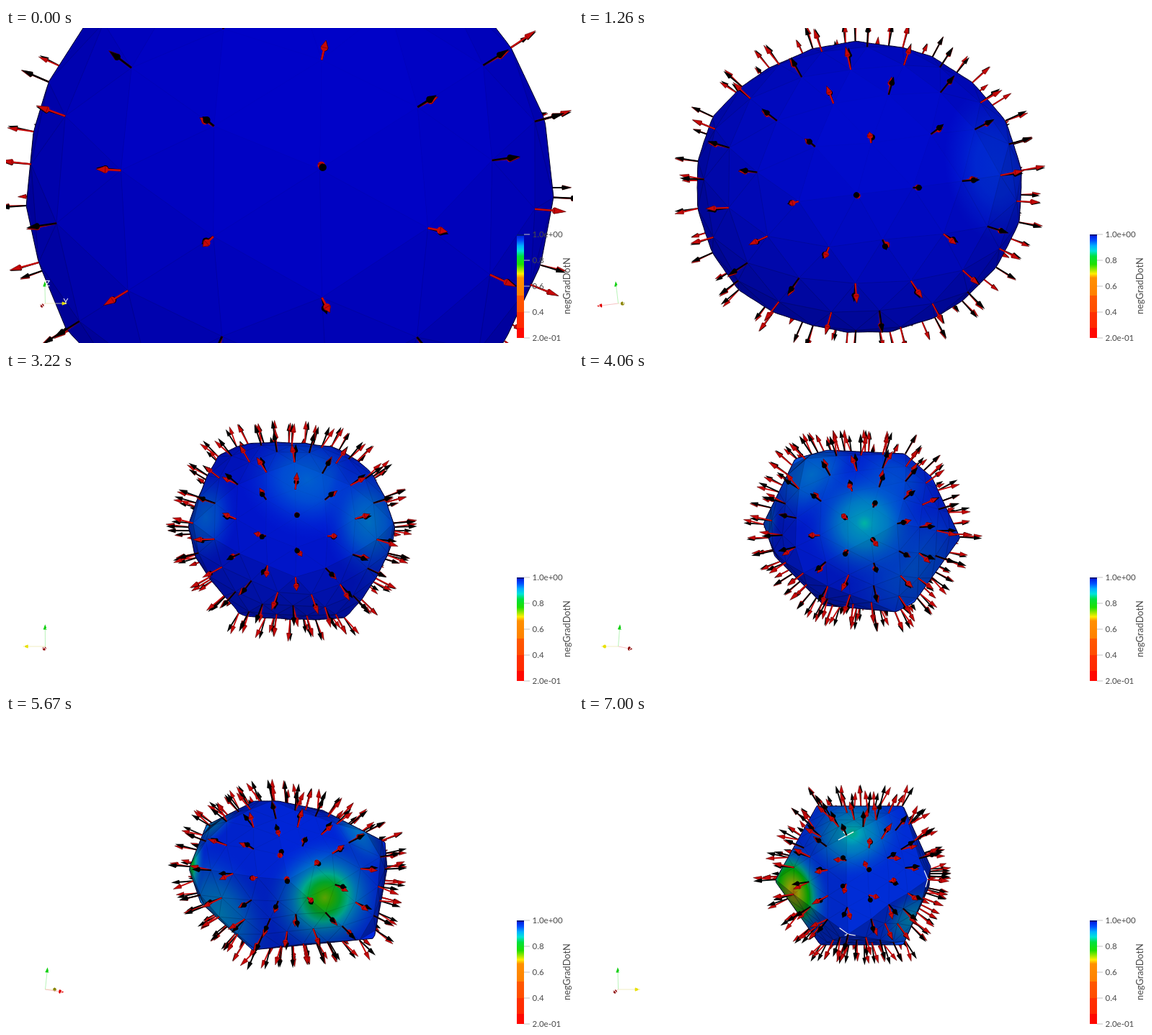
An HTML page with a canvas for the animation above (7.07 s loop, 787 by 438 pixels).

```html
<!DOCTYPE html>
<html lang="en">
<head>
<meta charset="utf-8">
<title>negGradDotN</title>
<style>
  html, body { margin: 0; width: 100%; height: 100%; overflow: hidden; background: #fff; }
  canvas { display: block; }
</style>
</head>
<body>
<canvas id="stage" width="787" height="438"></canvas>
<script>
const ctx = document.getElementById('stage').getContext('2d');
const W = 787, H = 438, CX = 393.5, CY = 222, FOCAL = 817;
const STEP = 70, LOOP = 7070, TURN = 7000;
const TILT = 7 * Math.PI / 180, START = 11 * Math.PI / 180;
const PHI = (1 + Math.sqrt(5)) / 2, RAYS = 180, TAU = 2 * Math.PI;

// Outline of the body at a few times: an oval early on, corners later
const outlines = [
  { time: 0 },
  { time: 1260, oval: [390, 222, 226, 202] },
  { time: 2450, oval: [403, 222, 164, 144] },
  { time: 4060, corners: '300,122 345,110 452,115 490,148 529,232 465,322 440,335 340,326 272,258 256,212' },
  { time: 4760, corners: '260,137 385,114 445,124 532,184 524,295 400,332 355,320 236,273 243,170' },
  { time: 5670, corners: '345,121 378,121 440,134 526,178 529,215 511,312 342,328 270,262 254,215 278,155' },
  { time: 7000, corners: '330,128 450,128 488,212 486,240 450,321 335,321 272,232' }
];

// Soft spots on the surface: azimuth, height, radius, drop in value, growth time
const spots = [
  [255, -.38, .85, .13, 4250],
  [126, .12, .45, .07, 1900],
  [188, .5, .6, .09, 2400],
  [243, .55, .5, .14, 4300],
  [3, .48, .6, .18, 5500],
  [57, -.55, .5, .17, 5900],
  [221, .08, .58, .23, 3400],
  [320, -.2, .66, .36, 4900]
];

const lerp = (a, b, u) => a + (b - a) * u;
const clamp = (v, lo = 0, hi = 1) => Math.min(hi, Math.max(lo, v));
const dot = (a, b) => a[0] * b[0] + a[1] * b[1] + a[2] * b[2];
const cross = (a, b) => [a[1]*b[2] - a[2]*b[1], a[2]*b[0] - a[0]*b[2], a[0]*b[1] - a[1]*b[0]];
const unit = v => v.map(c => c / Math.hypot(...v));
const sub = (a, b) => a.map((c, i) => c - b[i]);
const addScaled = (a, b, k) => a.map((c, i) => c + b[i] * k);

let seed = 17;
const random = () => (seed = (seed * 16807) % 2147483647) / 2147483647;

function buildSphere() {
  const dirs = [];
  for (const a of [-1, 1]) for (const b of [-PHI, PHI]) {
    dirs.push(unit([0, a, b]), unit([a, b, 0]), unit([b, 0, a]));
  }
  const edge = 2 / Math.hypot(1, PHI);
  const near = (i, j) => Math.abs(Math.hypot(...sub(dirs[i], dirs[j])) - edge) < .01;
  let faces = [];
  for (let i = 0; i < 12; i++) for (let j = i + 1; j < 12; j++) for (let k = j + 1; k < 12; k++) {
    if (!near(i, j) || !near(j, k) || !near(i, k)) continue;
    faces.push(dot(cross(dirs[i], dirs[j]), dirs[k]) > 0 ? [i, j, k] : [i, k, j]);
  }
  const normals = faces.map(f => unit(f.reduce((s, i) => addScaled(s, dirs[i], 1), [0, 0, 0])));
  for (let level = 0; level < 2; level++) {
    const cache = {};
    const mid = (i, j) => {
      const key = Math.min(i, j) + '-' + Math.max(i, j);
      if (!(key in cache)) cache[key] = dirs.push(unit(addScaled(dirs[i], dirs[j], 1))) - 1;
      return cache[key];
    };
    faces = faces.flatMap(([a, b, c]) => {
      const ab = mid(a, b), bc = mid(b, c), ca = mid(c, a);
      return [[a, ab, ca], [ab, b, bc], [ca, bc, c], [ab, bc, ca]];
    });
  }
  return { dirs, faces, flat: dirs.map(d => .795 / Math.max(...normals.map(n => dot(n, d)))) };
}

const sphere = buildSphere();
const jitter = sphere.dirs.map(() => [random() - .5, random() - .5, random() - .5]);

// View space is [right, up, toward the viewer]
const angleAt = t => START + TAU * t / TURN;
const spin = (x, y, z, a) => [y * Math.cos(a) - x * Math.sin(a), z, x * Math.cos(a) + y * Math.sin(a)];
const toView = ([x, y, z], a) => spin(
  x * Math.cos(TILT) + z * Math.sin(TILT), y, z * Math.cos(TILT) - x * Math.sin(TILT), a);
const project = p => {
  const s = FOCAL / (1 - p[2]);
  return [p[0] * s, -p[1] * s, s];
};

function modelAt(t) {
  const size = .142 + .268 * Math.exp(-t / 1400);
  const flatness = Math.pow(t / TURN, 1.2);
  const dirs = sphere.dirs.map(d => toView(d, angleAt(t)));
  const radii = sphere.flat.map(f => size * lerp(1, f, flatness));
  const points = dirs.map((d, i) => d.map(c => c * radii[i]));
  return { size, dirs, radii, points, flats: points.map(project) };
}

function hull(points) {
  const sorted = [...points].sort((a, b) => a[0] - b[0] || a[1] - b[1]);
  const chain = list => {
    const out = [];
    for (const p of list) {
      while (out.length > 1) {
        const [a, b] = out.slice(-2);
        if ((b[0]-a[0]) * (p[1]-a[1]) - (b[1]-a[1]) * (p[0]-a[0]) > 0) break;
        out.pop();
      }
      out.push(p);
    }
    return out.slice(0, -1);
  };
  return [...chain(sorted), ...chain(sorted.reverse())];
}

function rayLengths(poly) {
  return Array.from({ length: RAYS }, (_, j) => {
    const c = Math.cos(j * TAU / RAYS), s = Math.sin(j * TAU / RAYS);
    let best = 0;
    poly.forEach((p, i) => {
      const q = poly[(i + 1) % poly.length];
      const sp = c * p[1] - s * p[0], sq = c * q[1] - s * q[0];
      if (sp * sq > 0 || sp === sq) return;
      const u = sp / (sp - sq);
      best = Math.max(best, c * lerp(p[0], q[0], u) + s * lerp(p[1], q[1], u));
    });
    return best;
  });
}

const ovalPoints = ([x, y, rx, ry]) => Array.from({ length: 60 }, (_, i) => {
  const a = i * TAU / 60;
  return [x + rx * Math.cos(a) - CX, y + ry * Math.sin(a) - CY];
});
const cornerPoints = text => text.split(' ').map(pair => {
  const [x, y] = pair.split(',').map(Number);
  return [x - CX, y - CY];
});

// How far each outline departs from the plain model, per direction
const bends = outlines.map(({ time, oval, corners }) => {
  const base = rayLengths(hull(modelAt(time).flats));
  if (oval) {
    const mean = base.reduce((sum, r) => sum + r, 0) / RAYS;
    return { time, ratio: rayLengths(ovalPoints(oval)).map(r => r / mean) };
  }
  if (corners) return { time, ratio: rayLengths(cornerPoints(corners)).map((r, j) => r / base[j]) };
  return { time, ratio: base.map(() => 1) };
});

function bendAt(t) {
  let k = 0;
  while (k < bends.length - 2 && t >= bends[k + 1].time) k++;
  const a = bends[k], b = bends[k + 1], u = (t - a.time) / (b.time - a.time);
  return a.ratio.map((r, j) => lerp(r, b.ratio[j], u));
}

function bendPoint([x, y], ratio) {
  const pos = (Math.atan2(y, x) + TAU) % TAU / TAU * RAYS;
  const j = Math.floor(pos);
  const k = lerp(ratio[j % RAYS], ratio[(j + 1) % RAYS], pos - j);
  return [CX + x * k, CY + y * k];
}

function tracePath(points) {
  ctx.beginPath();
  points.forEach(p => ctx.lineTo(p[0], p[1]));
  ctx.closePath();
}

// Blue through cyan and green to orange as the value drops
function valueColor(drop, alpha) {
  const hue = drop < .15 ? lerp(230, 192, drop / .15)
    : drop < .23 ? lerp(192, 115, (drop - .15) / .08)
    : lerp(115, 28, clamp((drop - .23) / .15));
  return `hsla(${hue},100%,${lerp(45, 36, clamp(drop / .2))}%,${alpha})`;
}

function drawSpot([azimuth, up, radius, drop, time], t, model, ratio) {
  const grow = clamp((t - time) / 2800 + .5);
  if (!grow) return;
  const az = azimuth * Math.PI / 180, level = Math.sqrt(1 - up * up);
  const dir = spin(level * Math.cos(az), level * Math.sin(az), up, angleAt(t));
  if (dir[2] < -.15) return;
  const p = project(dir.map(c => c * model.size * .93));
  const [x, y] = bendPoint(p, ratio);
  const r = radius * model.size * p[2];
  const fill = ctx.createRadialGradient(0, 0, 0, 0, 0, r);
  for (let u = 0; u <= 1; u += .125) {
    fill.addColorStop(u, valueColor(drop * grow * (1 - u), clamp(1.7 * (1 - u)) * clamp(grow * 3)));
  }
  ctx.save();
  ctx.translate(x, y);
  ctx.rotate(Math.atan2(p[1], p[0]));
  ctx.scale(Math.max(.25, dir[2]), 1);
  ctx.fillStyle = fill;
  ctx.fillRect(-r, -r, 2 * r, 2 * r);
  ctx.restore();
}

function drawBody(t, model, ratio, places) {
  const base = rayLengths(hull(model.flats));
  const outline = base.map((r, j) => {
    const a = j * TAU / RAYS;
    return [CX + r * ratio[j] * Math.cos(a), CY + r * ratio[j] * Math.sin(a)];
  });
  const age = t / TURN;
  ctx.save();
  tracePath(outline);
  ctx.clip();
  ctx.fillStyle = `rgb(0,${Math.round(lerp(2, 48, age))},${Math.round(lerp(206, 228, age))})`;
  ctx.fillRect(0, 0, W, H);
  spots.forEach(s => drawSpot(s, t, model, ratio));
  const light = unit([.08, .32, .95]);
  ctx.lineWidth = .5;
  for (const f of sphere.faces) {
    const [a, b, c] = f.map(i => model.points[i]);
    const n = unit(cross(sub(b, a), sub(c, a)));
    if (dot(n, sub([0, 0, 1], a)) <= 0) continue;
    const shade = clamp(.03 + .42 * (1 - dot(n, light)), 0, .42);
    tracePath(f.map(i => places[i]));
    ctx.fillStyle = ctx.strokeStyle = `rgba(0,0,30,${shade})`;
    ctx.fill();
    ctx.stroke();
  }
  ctx.restore();
  tracePath(outline);
  ctx.strokeStyle = '#000028';
  ctx.lineWidth = 1;
  ctx.stroke();
}

function drawArrow(x, y, start, dir, color) {
  const at = k => project(addScaled(start, dir, .036 * k));
  const p0 = at(0), neck = at(.64), tip = at(1);
  const half = .0036 * tip[2], dx = x - p0[0], dy = y - p0[1];
  const nx = neck[0] + dx, ny = neck[1] + dy, tx = tip[0] + dx, ty = tip[1] + dy;
  const a = Math.atan2(ty - ny, tx - nx);
  const ox = -Math.sin(a) * half, oy = Math.cos(a) * half;
  ctx.strokeStyle = ctx.fillStyle = color;
  ctx.lineWidth = .0022 * p0[2];
  ctx.beginPath();
  ctx.moveTo(x, y);
  ctx.lineTo(nx, ny);
  ctx.stroke();
  ctx.beginPath();
  ctx.ellipse(nx, ny, half * Math.abs(dir[2]), half, a, 0, TAU);
  ctx.fill();
  tracePath([[nx + ox, ny + oy], [tx, ty], [nx - ox, ny - oy]]);
  ctx.fill();
  if (color !== '#000') {
    ctx.strokeStyle = '#400';
    ctx.lineWidth = .5;
    ctx.stroke();
  }
}

function drawArrows(t, model, places, front) {
  const spread = lerp(.16, .62, t / TURN);
  const order = model.dirs.map((_, i) => i)
    .filter(i => (model.dirs[i][2] > model.radii[i]) === front)
    .sort((a, b) => model.points[a][2] - model.points[b][2]);
  for (const i of order) {
    const d = model.dirs[i];
    const lean = unit(addScaled(d, toView(jitter[i], angleAt(t)), spread));
    const pair = [[d, '#000'], [lean, '#c60808']];
    if (i % 2) pair.reverse();
    pair.forEach(([dir, color]) => drawArrow(...places[i], model.points[i], dir, color));
  }
}

function drawCorners(t, model, places) {
  if (t < 6600) return;
  ctx.strokeStyle = '#fff';
  ctx.lineWidth = 1.2;
  for (let i = 0; i < 12; i++) {
    if (model.dirs[i][2] < .55) continue;
    const [x, y] = places[i];
    const arms = new Set(sphere.faces.filter(f => f.includes(i)).flat());
    ctx.beginPath();
    [...arms].filter(j => j !== i).slice(0, 3).forEach(j => {
      ctx.moveTo(x, y);
      ctx.lineTo(lerp(x, places[j][0], .42), lerp(y, places[j][1], .42));
    });
    ctx.stroke();
  }
}

function drawTriad(t) {
  const axes = [
    ['X', [1, 0, 0], '#e00000', '#8c0000', '#f4b4b4'],
    ['Y', [0, 1, 0], '#e8e000', '#8a8400', '#ece9b4'],
    ['Z', [0, 0, 1], '#10d010', '#087008', '#a8f0a8']
  ].map(a => [...a, toView(a[1], angleAt(t))]).sort((a, b) => a[5][2] - b[5][2]);
  ctx.font = '11px Lato, sans-serif';
  ctx.textAlign = 'center';
  for (const [name, , bright, dark, line, d] of axes) {
    const at = k => [54.5 + d[0] * k, 383 - d[1] * k];
    const neck = at(24), tip = at(31), a = Math.atan2(-d[1], d[0]);
    const ox = -Math.sin(a) * 2.6, oy = Math.cos(a) * 2.6;
    ctx.strokeStyle = line;
    ctx.lineWidth = .8;
    ctx.beginPath();
    ctx.moveTo(54.5, 383);
    ctx.lineTo(...neck);
    ctx.stroke();
    ctx.fillStyle = Math.abs(d[2]) > .7 ? dark : bright;
    tracePath([[neck[0] + ox, neck[1] + oy], tip, [neck[0] - ox, neck[1] - oy]]);
    ctx.fill();
    ctx.beginPath();
    ctx.ellipse(...neck, 2.6 * Math.abs(d[2]), 2.6, a, 0, TAU);
    ctx.fill();
    ctx.fillStyle = '#fff';
    ctx.fillText(name, at(29)[0] + (name === 'Z' ? 4 : 0), at(29)[1] + (name === 'Z' ? 5 : 1));
  }
}

function drawLegend() {
  const bar = ctx.createLinearGradient(0, 287, 0, 431);
  [[0, '#0010d8'], [.06, '#0050ff'], [.11, '#00b0ff'], [.16, '#00e4d8'], [.21, '#00e040'], [.29, '#20e000'],
   [.38, '#ffee00'], [.42, '#ff9000'], [.59, '#ff8000'], [.59, '#ff5800'], [.75, '#ff4c00'],
   [.75, '#ff3000'], [.9, '#ff2800'], [.9, '#ff0800']].forEach(s => bar.addColorStop(...s));
  ctx.fillStyle = bar;
  ctx.fillRect(709, 287, 10, 144);
  ctx.fillStyle = '#001480';
  ctx.fillRect(709, 287, 10, 2);
  ctx.font = '11.5px Lato, sans-serif';
  ctx.textAlign = 'left';
  ['1.0e+00', '0.8', '0.6', '0.4', '2.0e-01'].forEach((label, i) => {
    const y = 287 + i * 36;
    ctx.fillStyle = '#c4c4c4';
    ctx.fillRect(719, y - .5, 8, 1);
    ctx.fillStyle = '#4a4a4a';
    ctx.fillText(label, 730.5, y + 3.5);
  });
  ctx.save();
  ctx.translate(782.5, 398);
  ctx.rotate(-Math.PI / 2);
  ctx.font = '12.8px Lato, sans-serif';
  ctx.fillText('negGradDotN', 0, 0);
  ctx.restore();
}

function draw(t) {
  const model = modelAt(t), ratio = bendAt(t);
  const places = model.flats.map(p => bendPoint(p, ratio));
  ctx.fillStyle = '#fff';
  ctx.fillRect(0, 0, W, H);
  drawArrows(t, model, places, false);
  drawBody(t, model, ratio, places);
  drawCorners(t, model, places);
  drawArrows(t, model, places, true);
  drawTriad(t);
  drawLegend();
}

let shown = -1;
function tick() {
  const t = Math.floor(performance.now() % LOOP / STEP) * STEP;
  if (t !== shown) draw(shown = t);
  requestAnimationFrame(tick);
}
tick();
</script>
</body>
</html>
```
